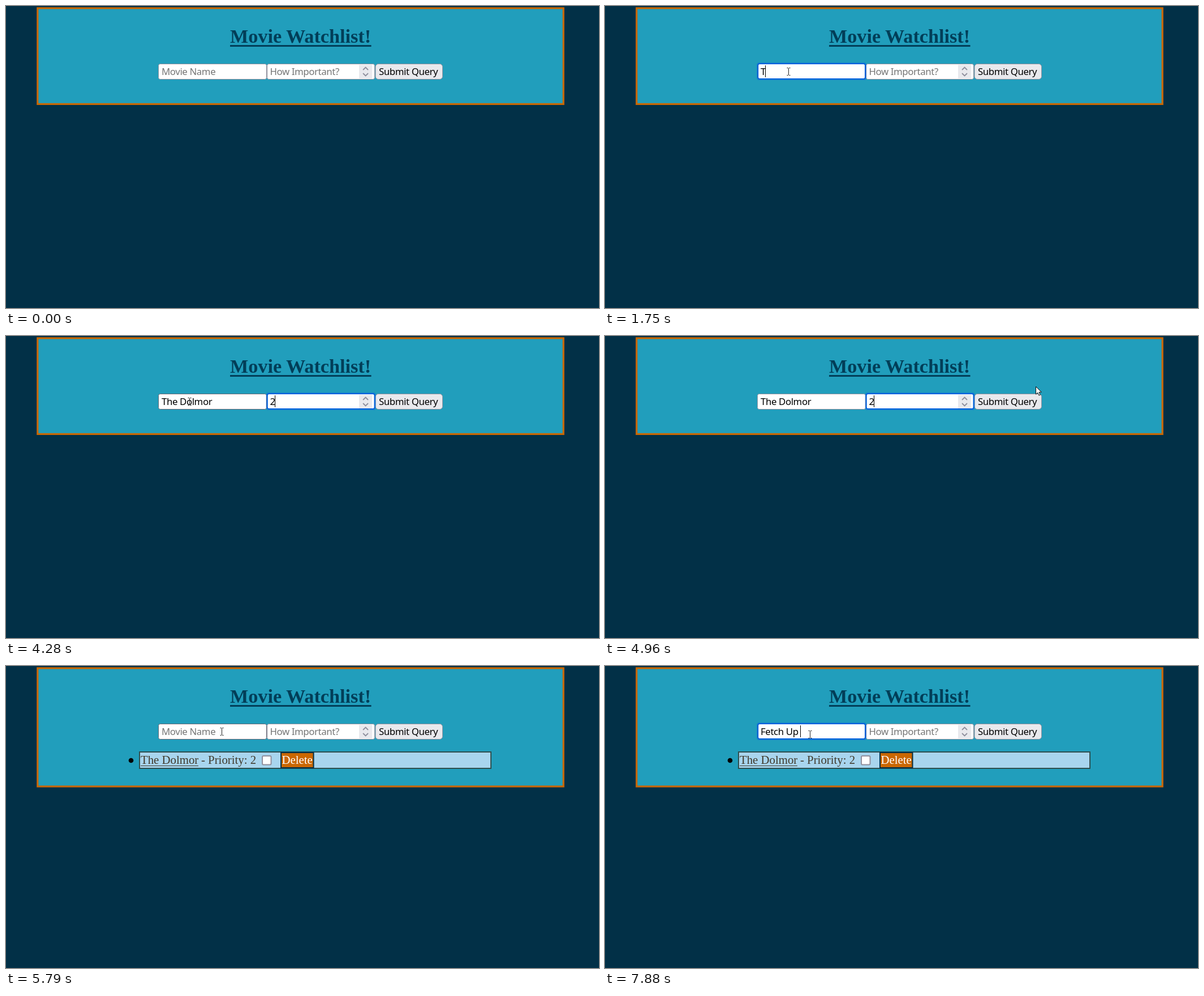
An HTML page that plays this animation: 1048x534 px, repeating every 8000 ms.

```html
<!DOCTYPE html>
<html lang="en">
<head>
<meta charset="utf-8">
<title>Movie Watchlist</title>
<style>
  html, body { margin: 0; width: 100%; height: 100%; overflow: hidden; background: #023047; }
  svg { display: block; }
  text { white-space: pre; }
  .serif { font: 20.8px "Liberation Serif", "Times New Roman", serif; fill: #40392b; }
  .title { font-size: 34.2px; font-weight: bold; fill: #023e58; text-anchor: middle; }
  .form { font: 16.8px "Noto Sans", "Open Sans", sans-serif; letter-spacing: -.38px; }
  .field { fill: #fff; stroke: #8f8f9d; }
  .button { fill: #e9e9ed; stroke: #8f8f9d; }
  .field.hover { stroke: #676774; }
  .button.hover { fill: #d0d0d7; stroke: #676774; }
  .ring rect { fill: none; stroke: #0060df; }
</style>
</head>
<body>
<svg width="1048" height="534" viewBox="0 0 1048 534">
  <rect width="1048" height="534" fill="#023047"/>
  <rect id="panel" x="55.8" y="3.8" width="929.4" fill="#219ebc" stroke="#ca6702" stroke-width="3.2"/>
  <text class="serif title" x="520.5" y="65">Movie Watchlist!</text>
  <rect x="396" y="69" width="249.5" height="3" fill="#023e58"/>

  <g class="form">
    <rect id="nameBox" class="field" x="269.5" y="102.5" width="191" height="27" rx="3"/>
    <rect id="rankBox" class="field" x="461.5" y="102.5" width="190" height="27" rx="3"/>
    <rect x="624" y="104" width="23" height="24" fill="#e9e9ed"/>
    <path d="M631 113l4.5-4.5 4.5 4.5M631 119l4.5 4.5 4.5-4.5" fill="none" stroke="#8f8f9d" stroke-width="1.8"/>
    <rect id="submit" class="button" x="653" y="102.5" width="118.5" height="27" rx="5"/>
    <text x="659" y="122">Submit Query</text>
    <g id="ring" class="ring">
      <rect x="-1.5" y="100.2" width="193.2" height="30.6" rx="4" stroke-width="1.5" stroke-opacity=".3"/>
      <rect x=".2" y="101.9" width="189.8" height="27.2" rx="3" stroke-width="2"/>
    </g>
    <text id="name" x="275" y="122"></text>
    <text id="rank" x="466.4" y="122"></text>
    <rect id="caret" y="105" width="1" height="21"/>
  </g>

  <g id="item" class="serif">
    <circle cx="221" cy="167" r="4.3" fill="#000"/>
    <rect x="236" y="152" width="621" height="29" fill="#a8d5ee" stroke="#2f4f4f" stroke-width="2"/>
    <text x="238" y="173">The Dolmor</text>
    <rect x="238" y="176" width="102" height="1"/>
    <text x="345" y="173">- Priority: 2</text>
    <rect x="453" y="159" width="15.5" height="15.5" rx="2" fill="#fff" stroke="#8f8f9d" stroke-width="2"/>
    <rect x="486" y="153" width="57.5" height="27" fill="#ca6702" stroke="#023047" stroke-width="2"/>
    <text x="487.5" y="173" fill="#fff">Delete</text>
  </g>

  <path id="arrow" d="M.5.5v13.6l3.2-3 2.2 5 2.3-1-2.2-4.9h4.3z" fill="#fff" stroke="#111"/>
  <path id="beam" d="M-2.5-6.5h2l1 1 1-1h2M.5-6v12M-2.5 6.5h2l1-1 1 1h2" fill="none" stroke="#222"/>
</svg>
<script>
const LOOP = 8000;
const PRESSED = 5380;
const SUBMITTED = 5790;
const BLINK_ON = 530;
const BLINK_CYCLE = 800;
const el = id => document.getElementById(id);

// Each burst of typing: start, delay between keys, number of keys
const keyTimes = bursts => bursts.flatMap(([start, delay, count]) =>
  Array.from({ length: count }, (_, i) => start + i * delay));

const firstTitle = { text: "The Dolmor", keys: keyTimes([[1750, 110, 4], [2280, 170, 3], [2820, 110, 3]]) };
const nextTitle = { text: "Fetch Up ", keys: keyTimes([[6930, 0, 1], [7130, 102, 5], [7740, 70, 3]]) };
const priority = { text: "2", keys: [4010] };

const focusSpans = [
  { from: 960, to: 3220, field: "name", ringX: 270 },
  { from: 3220, to: PRESSED, field: "rank", ringX: 461.5 },
  { from: 6200, to: LOOP, field: "name", ringX: 270 }
];
const caretResets = [
  ...focusSpans.map(span => span.from), ...firstTitle.keys, ...priority.keys, ...nextTitle.keys
];

// Pointer strokes: each bends towards one control point and starts where the last ended
const easeInOut = u => (1 - Math.cos(Math.PI * u)) / 2;
const easeOut = u => 1 - (1 - u) ** 3;
const entry = [780, 441];
const strokes = [
  { from: 130, to: 890, steps: 11, bend: [430, 165], end: [324, 116], ease: easeInOut },
  { from: 4540, to: 5030, steps: 7, bend: [593, 79], end: [780, 90], ease: easeInOut },
  { from: 5030, to: 5310, steps: 4, bend: [785, 100], end: [745, 111], ease: easeInOut },
  { from: PRESSED, to: 5740, steps: 5, bend: [570, 116], end: [398, 125], ease: easeInOut },
  { from: 5740, to: 6130, steps: 8, bend: [369, 106], end: [362, 121], ease: easeOut }
];

function pointerAt(t) {
  let start = entry;
  for (const { from, to, steps, bend, end, ease } of strokes) {
    if (t < from) break;
    if (t < to) {
      const k = ease(Math.floor((t - from) / (to - from) * steps + 1e-6) / steps);
      return [0, 1].map(n => Math.round(
        (1 - k) ** 2 * start[n] + 2 * k * (1 - k) * bend[n] + k * k * end[n]));
    }
    start = end;
  }
  return start;
}

const typed = ({ text, keys }, t) => text.slice(0, keys.filter(k => k <= t).length);
const show = (id, on) => el(id).setAttribute("visibility", on ? "visible" : "hidden");

function setField(id, value, hint) {
  el(id).textContent = value || hint;
  el(id).setAttribute("fill", value ? "#000" : "#757575");
}

function drawPointer(t) {
  const [x, y] = pointerAt(t);
  const visible = t >= strokes[0].from;
  const busy = t >= PRESSED && t < SUBMITTED;
  const over = (left, right) => visible && y >= 102 && y <= 130 && x >= left && x < right;
  const beam = over(269, 624);
  show("beam", beam);
  show("arrow", visible && !beam);
  for (const id of ["beam", "arrow"]) el(id).setAttribute("transform", `translate(${x} ${y})`);
  el("nameBox").classList.toggle("hover", over(269, 461) && !busy);
  el("rankBox").classList.toggle("hover", over(461, 652) && !busy);
  el("submit").classList.toggle("hover", over(653, 772) || busy);
}

function drawFocus(t) {
  const focus = focusSpans.find(({ from, to }) => t >= from && t < to);
  const idle = t - Math.max(...caretResets.filter(k => k <= t));
  show("ring", focus);
  show("caret", focus && idle % BLINK_CYCLE < BLINK_ON);
  if (!focus) return;
  const field = el(focus.field);
  const empty = field.getAttribute("fill") !== "#000";
  const width = empty ? 0 : field.getComputedTextLength();
  el("caret").setAttribute("x", Math.round(+field.getAttribute("x") + width - .6));
  el("ring").setAttribute("transform", `translate(${focus.ringX} 0)`);
}

function draw(t) {
  const done = t >= SUBMITTED;
  el("panel").setAttribute("height", done ? 209.2 : 169.6);
  show("item", done);
  setField("name", typed(done ? nextTitle : firstTitle, t), "Movie Name");
  setField("rank", done ? "" : typed(priority, t), "How Important?");
  drawFocus(t);
  drawPointer(t);
}

const start = performance.now();
function tick() {
  draw((performance.now() - start) % LOOP);
  requestAnimationFrame(tick);
}
tick();
</script>
</body>
</html>
```
